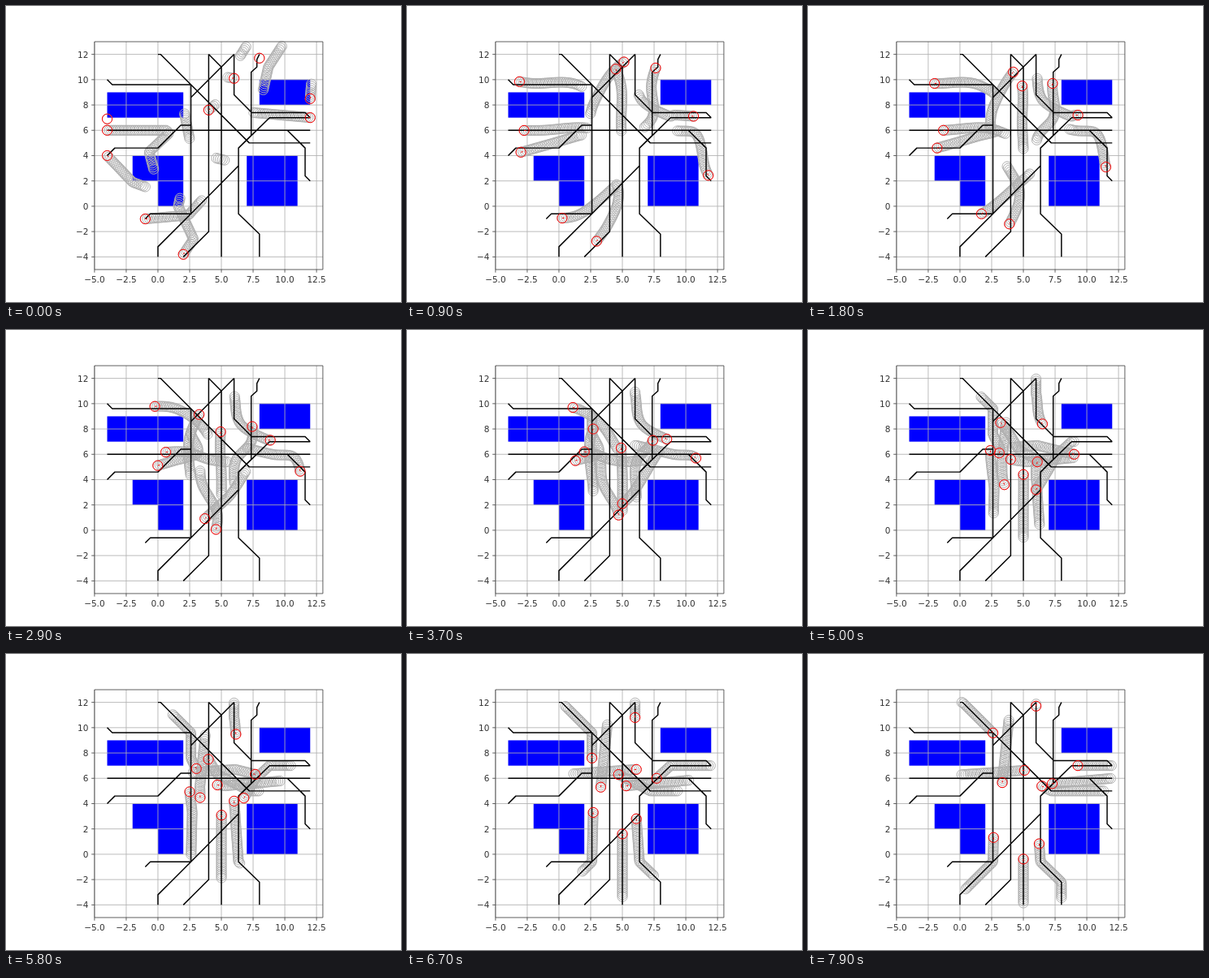
Recreate the animation shown at these times as an HTML page. Size 486x365 px, loop 8000 ms.

```html
<!DOCTYPE html>
<html lang="en">
<head>
<meta charset="utf-8">
<title>Multi-agent path planning</title>
<style>
  html, body { margin: 0; width: 100%; height: 100%; overflow: hidden; background: #fff; }
  svg { display: block; width: 486px; height: 365px; }
  text { font: 10.5px "DejaVu Sans", sans-serif; fill: #333; }
  path { fill: none; }
  #grid { stroke: #b0b0b0; stroke-width: .85; }
  #blocks { fill: #00f; }
  #trails { stroke: #b0b0b0; stroke-width: 1; }
  #routes { stroke: #000; stroke-width: 1.45; stroke-linejoin: round; }
  #agents { stroke: #f00; stroke-width: 1; }
  #frame { stroke: #444; stroke-width: .85; }
</style>
</head>
<body>
<svg viewBox="0 0 486 365">
  <g id="blocks"></g>
  <path id="grid"/>
  <path id="trails"/>
  <path id="routes"/>
  <path id="agents"/>
  <path id="frame"/>
  <g id="labels"></g>
</svg>
<script>
const LOOP = 8000, STEP = 100;
const UNIT = 15.61, RADIUS = 6.1;
const LEFT = 108.9, TOP = 44, SIDE = 18 * UNIT;
const RIGHT = LEFT + SIDE, BOTTOM = TOP + SIDE;
const PACE = 1.65, SPACING = .165, HORIZON = 31;

const $ = id => document.getElementById(id);
const px = x => +(LEFT + (x + 5) * UNIT).toFixed(2);
const py = y => +(BOTTOM - (y + 5) * UNIT).toFixed(2);

// "x,y x,y" -> [[x, y], ...]
const points = s => s.split(' ').map(p => p.split(',').map(Number));
const mix = (a, b, u) => a.map((v, k) => v + (b[k] - v) * u);
const distance = (a, b) => Math.hypot(b[0] - a[0], b[1] - a[1]);
const line = pts => 'M' + pts.map(([x, y]) => px(x) + ' ' + py(y)).join('L');
const ring = ([x, y]) =>
  `M${px(x) - RADIUS} ${py(y)}a${RADIUS} ${RADIUS} 0 1 0 ${2 * RADIUS} 0a${RADIUS} ${RADIUS} 0 1 0 ${-2 * RADIUS} 0`;

// An agent leaves the start of its route, dodges others through four
// places at VIA_TIMES, then rejoins the route and follows it at its pace.
const VIA_TIMES = [100, 1800, 3700, 5000, 6700];
const HANDOVER = VIA_TIMES.at(-1);

function agent(routeText, viaText, pace = PACE) {
  const route = points(routeText);
  const keys = [route[0], ...points(viaText)];
  return { route, keys, pace, rest: rejoin(route, keys.at(-1)) };
}

// The part of the route after its segment nearest to p.
function rejoin(route, p) {
  const detour = i => distance(route[i], p) + distance(p, route[i + 1]) - distance(route[i], route[i + 1]);
  let best = 0;
  for (let i = 1; i < route.length - 1; i++) if (detour(i) < detour(best)) best = i;
  return [p, ...route.slice(best + 1)];
}

const agents = [
  agent('-4,10 -3.6,9.6 2.6,9.6 7.2,5 12,5', '-2,9.7 1.1,9.7 3.2,8.5 4.7,6.3'),
  agent('-4,6 12,6', '-1.3,6 2,6.2 4,5.6 5.3,5.4'),
  agent('-4,4 -3.4,4.6 0,4.6 1.8,6.4 2.6,6.4 2.6,9.6 0.2,12 0,12', '-1.8,4.6 1.3,5.5 3.1,6.1 2.6,7.6'),
  agent('-1,-1 -0.6,-0.6 2.6,-0.6 6.35,3.2 6.35,4.6 8.8,7 12,7', '1.7,-0.6 5,2.1 6,3.2 7.7,6'),
  agent('2,-4 4,-2 4,12', '3.9,-1.4 4.7,1.2 3.5,3.6 3.3,5.3', .3),
  agent('4,12 5,11 5,-4', '4.9,9.5 4.9,6.5 5,4.4 5,1.6'),
  agent('6,12 2.6,8.6 2.6,-0.6 0,-3.2 0,-4', '4.2,10.6 2.7,8 2.4,6.3 2.7,3.3'),
  agent('8,12 7.8,11.6 7.8,11 7.35,10.6 7.35,5.6 6.35,4.6 6.35,-0.6 8,-2.2 8,-4', '7.3,9.7 7.4,7.1 6.1,5.4 6.1,2.8'),
  agent('12,7 11.6,7.4 7.4,7.4 6,8.8 6,12', '9.3,7.2 8.5,7.2 6.5,8.4 6,10.8', .75),
  agent('12,2 11.6,2.4 11.6,4.6 10.2,6 -4,6', '11.5,3.1 10.8,5.7 9,6 6.1,6.7', .85)
];

// Unsettled first plans: one step only, some not tied to an agent.
const firstPlans = [
  '-4,6.9', '-4,6 0.7,6 1.7,4.4', '-4,4 -2,1.9 -0.9,1.5', '-1,-1 2.4,-0.7 4.3,1.4',
  '2,-3.8 2.8,-2.6 1.6,0 1.8,0.9', '4,7.6 4.6,8.1', '6,10.1 5.4,10.2', '8,11.7',
  '12,8.5 12.1,9.8', '12,7 7.5,7.4'
].map(points);
const loosePlans = [
  '2.1,7.3 2.5,5.3', '0.8,5.7 -0.7,4.3 -0.3,2.8', '4.6,3.8 5.4,3.6',
  '6.5,11.9 7,12.7', '8.3,9.2 8.7,11 9.8,12.7'
].map(points);

// Up to count evenly spaced places along a polyline.
function walk(pts, gap = SPACING, count = HORIZON) {
  const out = [pts[0]];
  let next = gap;
  for (let i = 1; i < pts.length; i++) {
    const d = distance(pts[i - 1], pts[i]);
    for (; next <= d && out.length < count; next += gap)
      out.push(mix(pts[i - 1], pts[i], next / d));
    next -= d;
  }
  return out;
}

// What is left of a polyline after covering a length.
function remainder(pts, length) {
  for (let i = 1; i < pts.length; i++) {
    const d = distance(pts[i - 1], pts[i]);
    if (length < d) return [mix(pts[i - 1], pts[i], length / d), ...pts.slice(i)];
    length -= d;
  }
  return pts.slice(-1);
}

// Smooth motion through the keys.
function place(keys, t) {
  const T = VIA_TIMES, end = T.length - 1;
  let i = 0;
  while (i < end - 1 && t >= T[i + 1]) i++;
  const span = T[i + 1] - T[i], u = (t - T[i]) / span;
  const slope = (j, k) => {
    const a = Math.max(j - 1, 0), b = Math.min(j + 1, end);
    return (keys[b][k] - keys[a][k]) / (T[b] - T[a]) * span;
  };
  return [0, 1].map(k => {
    const p = keys[i][k], q = keys[i + 1][k], m = slope(i, k), n = slope(i + 1, k);
    return p + u * (m + u * (3 * (q - p) - 2 * m - n + u * (2 * (p - q) + m + n)));
  });
}

// The way an agent will take from time t on.
function plan({ keys, rest, pace }, t) {
  if (t >= HANDOVER) return walk(remainder(rest, pace * (t - HANDOVER) / 1000));
  const pts = [];
  for (let s = t; s < HANDOVER; s += STEP) pts.push(place(keys, s));
  return walk(pts.concat(rest));
}

function heading([a, b = a]) {
  return line([a, mix(a, b, 1)]);
}

function drawStatic() {
  const blocks = [[-4, 7, 6, 2], [8, 8, 4, 2], [-2, 2, 4, 2], [0, 0, 2, 2], [7, 0, 4, 4]];
  $('blocks').innerHTML = blocks.map(([x, y, w, h]) =>
    `<rect x="${px(x)}" y="${py(y + h)}" width="${w * UNIT}" height="${h * UNIT}"/>`).join('');

  let grid = '', labels = '';
  let frame = `M${LEFT} ${TOP}H${RIGHT}V${BOTTOM}H${LEFT}Z`;
  const minus = s => s.replace('-', '\u2212');
  for (let x = -5; x <= 12.5; x += 2.5) {
    grid += `M${px(x)} ${TOP}V${BOTTOM}`;
    frame += `M${px(x)} ${BOTTOM}v3.7`;
    labels += `<text x="${px(x)}" y="340.6" text-anchor="middle">${minus(x.toFixed(1))}</text>`;
  }
  for (let y = -4; y <= 12; y += 2) {
    grid += `M${LEFT} ${py(y)}H${RIGHT}`;
    frame += `M${LEFT} ${py(y)}h-3.7`;
    labels += `<text x="101.4" y="${py(y) + 4}" text-anchor="end">${minus(String(y))}</text>`;
  }
  $('grid').setAttribute('d', grid);
  $('frame').setAttribute('d', frame);
  $('labels').innerHTML = labels;
  $('routes').setAttribute('d', agents.map(a => line(a.route)).join(''));
}

function draw(t) {
  const settled = t >= VIA_TIMES[0];
  const plans = settled ? agents.map(a => plan(a, t)) : firstPlans.map(p => walk(p));
  const loose = settled ? [] : loosePlans.map(p => walk(p));
  $('trails').setAttribute('d', [...plans, ...loose].flat().map(ring).join(''));
  $('agents').setAttribute('d', plans.map(p => ring(p[0]) + heading(p)).join(''));
}

drawStatic();
const start = performance.now();
let shown = -1;
function tick() {
  const t = Math.floor((performance.now() - start) % LOOP / STEP) * STEP;
  if (t !== shown) draw(shown = t);
  requestAnimationFrame(tick);
}
tick();
</script>
</body>
</html>
```
